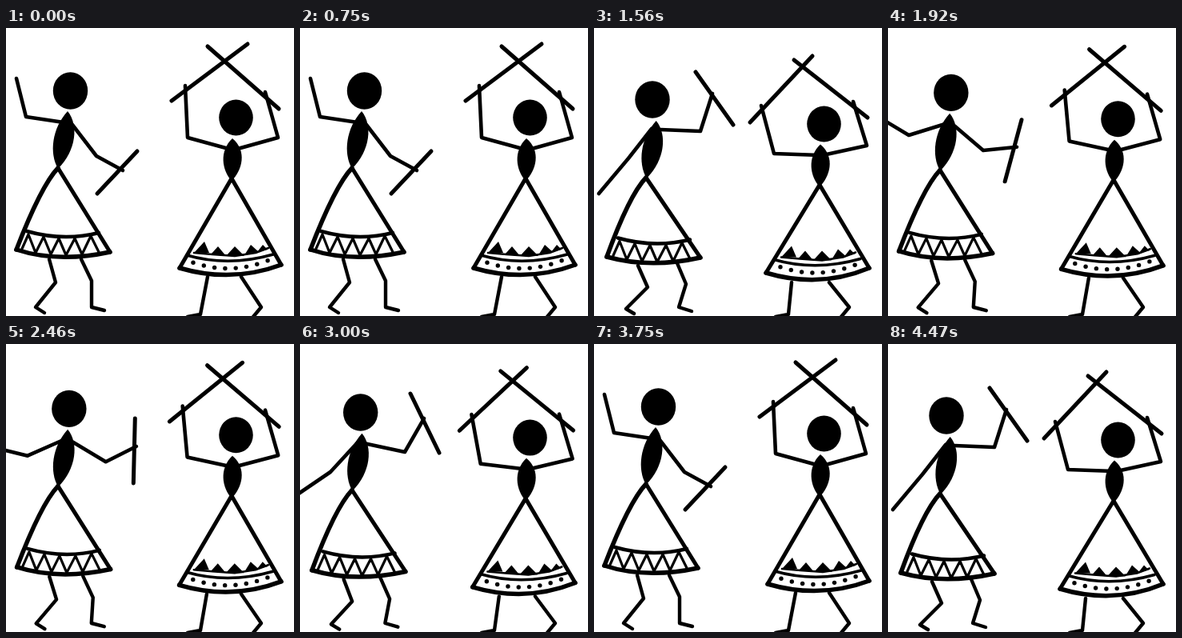
Animation of 360x360 px, one loop 4.5 s. Source, as an HTML page with a canvas:

```html
<!DOCTYPE html>
<html lang="en">
<head>
<meta charset="utf-8">
<title>Stick dancers</title>
<style>
html, body { margin: 0; width: 100%; height: 100%; overflow: hidden; background: #fff; }
canvas { display: block; width: 360px; height: 360px; }
</style>
</head>
<body>
<canvas id="stage" width="360" height="360"></canvas>
<script>
const ctx = document.getElementById('stage').getContext('2d');
const LOOP = 4500, STEP = 37.5;

// Start of each swing; the last one stops at its far end before the cut.
const beats = [0, 375, 750, 1261, 1820, 2320, 2827, 3307, 3750, 4140, 4680];

// Arm swing of the left dancer: [swing, body dip, left hand, left elbow, right elbow, right hand, stick ends]
const poses = [
  [0, 0, 13, 63, 25, 111, 113, 160, 146, 178, 164, 154, 114, 207],
  [.3, .22, -17, 108, 26, 134, 119, 153, 161, 149, 167, 115, 146, 192],
  [.45, .22, -22, 129, 27, 140, 125, 147, 163, 127, 161, 92, 160, 173],
  [.82, .64, -3, 188, 38, 160, 131, 135, 155, 93, 138, 62, 174, 136],
  [1, 1, 6, 207, 43, 163, 133, 129, 148, 82, 127, 55, 174, 121]
];

const mix = (a, b, k) => a + (b - a) * k;

function swingAt(time) {
  const i = beats.findIndex((b, n) => time < beats[n + 1]);
  let phase = (time - beats[i]) / (beats[i + 1] - beats[i]);
  if (i === beats.length - 2) phase = Math.min(phase, .5);
  return (1 - Math.cos(phase * 2 * Math.PI)) / 2;
}

function poseAt(swing) {
  const i = Math.max(1, poses.findIndex(p => swing <= p[0] + 1e-9));
  const a = poses[i - 1], b = poses[i];
  return a.map((v, n) => mix(v, b[n], (swing - a[0]) / (b[0] - a[0])));
}

function line(width, ...p) {
  ctx.lineWidth = width;
  ctx.beginPath();
  for (let i = 0; i < p.length; i += 2) ctx.lineTo(p[i], p[i + 1]);
  ctx.stroke();
}

function curve(width, x, y, cx, cy, ex, ey) {
  ctx.lineWidth = width;
  ctx.beginPath();
  ctx.moveTo(x, y);
  ctx.quadraticCurveTo(cx, cy, ex, ey);
  ctx.stroke();
}

function oval(x, y, rx, ry) {
  ctx.beginPath();
  ctx.ellipse(x, y, rx, ry, 0, 0, 7);
  ctx.fill();
}

function triangle(...p) {
  ctx.beginPath();
  for (let i = 0; i < 6; i += 2) ctx.lineTo(p[i], p[i + 1]);
  ctx.fill();
}

function leftDancer(pose) {
  const dip = pose[1], to = (a, b) => mix(a, b, dip);
  const [lhx, lhy, lex, ley, rex, rey, rhx, rhy, ...stick] = pose.slice(2);

  oval(to(80.5, 73), to(78.5, 89.5), 21.7, 23.2);
  line(4.6, lhx, lhy, lex, ley, 72, to(118, 126));
  line(4.6, 83, to(121, 127), rex, rey, rhx, rhy);
  line(5, ...stick);

  ctx.save();
  ctx.translate(to(0, .7), to(0, 12));
  ctx.beginPath();
  ctx.moveTo(77, 104);
  ctx.bezierCurveTo(91, 121, 88, 153, 65, 176);
  ctx.bezierCurveTo(54, 157, 57, 126, 77, 104);
  ctx.fill();
  ctx.restore();

  const top = to(175, 187), lx = to(13, 16), ly = to(277, 286), rx = to(130, 133), ry = to(280, 287);
  curve(5.5, 65, top, 44, top + 22, lx, ly);
  line(5, 65, top, rx, ry);
  curve(5.5, lx, ly, to(65, 70), to(294, 301), rx, ry);

  ctx.save();
  ctx.translate(to(0, 4), to(0, 8.5));
  curve(4.5, 26, 254, 72, 267, 116, 256);
  line(3.2, 20, 276, 28, 258, 37, 281, 47, 261, 56, 283, 66, 263, 75, 284,
    86, 263, 95, 283, 106, 260, 116, 280);
  ctx.restore();

  line(4.4, to(54, 55), to(289, 297), to(62, 67), to(318, 324), to(37, 40), to(349, 351), to(48, 50), to(356, 357));
  line(4.4, to(94, 104), to(289, 294), to(107, 115), to(316, 320), to(107, 106), 349, to(123, 122), to(353, 354));
}

function rightDancer(dip) {
  const to = (a, b) => mix(a, b, dip);

  oval(287.5, to(112, 120), 21.3, 22.5);
  line(5, to(207, 195), to(91, 118), to(302, 273), to(20, 35));
  line(5, to(252, 250), to(23, 40), to(341, 342), to(101, 112));
  line(4.6, to(224, 209), to(72, 97), to(227, 225), to(137, 157), 282, to(152, 159));
  line(4.6, 324, to(80, 92), to(340, 341), to(137, 147), 286, to(152, 159));

  ctx.save();
  ctx.translate(0, to(0, 7.5));
  ctx.beginPath();
  ctx.moveTo(283, 138);
  ctx.bezierCurveTo(302, 154, 295, 178, 282, 191);
  ctx.bezierCurveTo(270, 178, 266, 154, 283, 138);
  ctx.fill();
  ctx.restore();

  const top = to(188, 196), lx = to(217, 215), ly = to(300, 306), ry = to(296, 300);
  line(5, lx, ly, 282, top, 344, ry);
  curve(5.5, lx, ly, 282, to(319, 326), 344, ry);

  ctx.save();
  ctx.translate(to(0, -1), to(0, 5.5));
  curve(3.6, 226, 284, 278, 299, 334, 283);
  triangle(235, 281, 248, 267, 254, 281);
  triangle(256, 283, 265, 273, 275, 285);
  triangle(275, 285, 286, 273, 298, 285);
  triangle(298, 284, 306, 271, 316, 280);
  triangle(314, 280, 321, 271, 327, 277);
  line(2.5, 235, 281, 258, 283, 286, 285, 312, 281, 328, 275);
  for (let i = 0; i < 8; i++) {
    const x = 234 + i * 13.3;
    oval(x, 300.5 - ((x - 277) / 16) ** 2, 2.7, 2.7);
  }
  ctx.restore();

  line(4.4, to(252, 247), to(311, 318), 243, 358, 227, 361);
  line(4.4, 294, to(311, 318), 319, 349, 309, 361);
}

function draw(now) {
  const time = Math.floor((now % LOOP) / STEP) * STEP;
  const pose = poseAt(swingAt(time));
  ctx.fillStyle = '#fff';
  ctx.fillRect(0, 0, 360, 360);
  ctx.fillStyle = ctx.strokeStyle = '#000';
  ctx.lineCap = ctx.lineJoin = 'round';
  leftDancer(pose);
  rightDancer(pose[1]);
}

let start;
function tick(now) {
  start ??= now;
  draw(now - start);
  requestAnimationFrame(tick);
}
draw(0);
requestAnimationFrame(tick);
</script>
</body>
</html>
```
